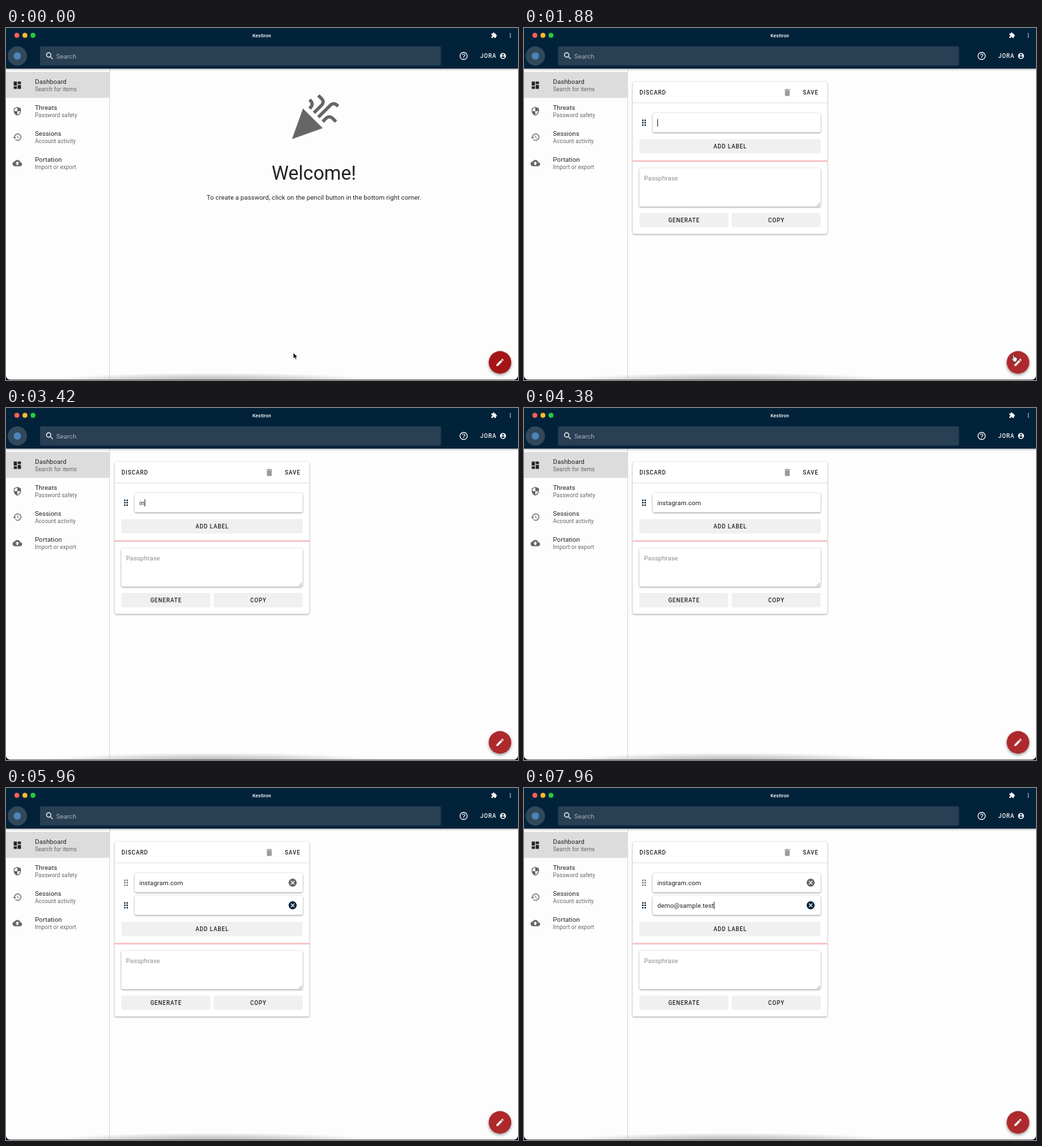
Animation, 768 px wide and 529 px high, one loop 8 s. Source, as an HTML page:

```html
<!DOCTYPE html>
<html lang="en">
<head>
<meta charset="utf-8">
<title>Password manager</title>
<style>
html, body { margin: 0; width: 100%; height: 100%; overflow: hidden; background: #000; }
svg { display: block; width: 768px; height: 529px; font-family: Roboto, "Open Sans", sans-serif; }
text { font-size: 9.6px; letter-spacing: .09px; fill: #212121; white-space: pre; }
.sub { font-size: 8.4px; fill: #666; }
.btn { font-size: 8.4px; font-weight: 500; letter-spacing: .75px; }
.mid { text-anchor: middle; }
.card { fill: #fff; filter: drop-shadow(0 1px 1px rgba(0,0,0,.3)) drop-shadow(0 0 1px rgba(0,0,0,.14)); }
.field { fill: #fff; filter: drop-shadow(0 1px .8px rgba(0,0,0,.36)) drop-shadow(0 0 .8px rgba(0,0,0,.12)); }
.flat { fill: #f0f0f0; }
</style>
</head>
<body>
<svg id="stage" viewBox="0 0 768 529"></svg>
<script>
const LOOP = 8000;
const NAVY = '#02223a', GREY = '#666', DIM = '#777';
const OPEN = 1580, TYPE1 = 3330, FOCUS = 4960, PRESS = 5130, ADD = 5210;
const LABEL1 = 'instagram.com', LABEL2 = 'demo@sample.test';

const paths = {
  dashboard: 'M3 13h8V3H3v10zm0 8h8v-6H3v6zm10 0h8V11h-8v10zm0-18v6h8V3h-8z',
  shield: 'M12 1L3 5v6c0 5.55 3.84 10.74 9 12 5.16-1.26 9-6.45 9-12V5l-9-4zm0 10.99h7c-.53 4.12-3.28 7.79-7 8.94V12H5V6.3l7-3.11v8.8z',
  history: 'M13 3c-4.97 0-9 4.03-9 9H1l3.89 3.89.07.14L9 12H6c0-3.87 3.13-7 7-7s7 3.13 7 7-3.13 7-7 7c-1.93 0-3.68-.79-4.94-2.06l-1.42 1.42C8.27 19.99 10.51 21 13 21c4.97 0 9-4.03 9-9s-4.03-9-9-9zm-1 5v5l4.28 2.54.72-1.21-3.5-2.08V8H12z',
  backup: 'M19.35 10.04C18.67 6.59 15.64 4 12 4 9.11 4 6.6 5.64 5.35 8.04 2.34 8.36 0 10.91 0 14c0 3.31 2.69 6 6 6h13c2.76 0 5-2.24 5-5 0-2.64-2.05-4.78-4.65-4.96zM14 13v4h-4v-4H7l5-5 5 5h-3z',
  search: 'M15.5 14h-.79l-.28-.27C15.41 12.59 16 11.11 16 9.5 16 5.91 13.09 3 9.5 3S3 5.91 3 9.5 5.91 16 9.5 16c1.61 0 3.09-.59 4.23-1.57l.27.28v.79l5 4.99L20.49 19l-4.99-5zm-6 0C7.01 14 5 11.99 5 9.5S7.01 5 9.5 5 14 7.01 14 9.5 11.99 14 9.5 14z',
  help: 'M11 18h2v-2h-2v2zm1-16C6.48 2 2 6.48 2 12s4.48 10 10 10 10-4.48 10-10S17.52 2 12 2zm0 18c-4.41 0-8-3.59-8-8s3.59-8 8-8 8 3.59 8 8-3.59 8-8 8zm0-14c-2.21 0-4 1.79-4 4h2c0-1.1.9-2 2-2s2 .9 2 2c0 2-3 1.75-3 5h2c0-2.25 3-2.5 3-5 0-2.21-1.79-4-4-4z',
  person: 'M12 2C6.48 2 2 6.48 2 12s4.48 10 10 10 10-4.48 10-10S17.52 2 12 2zm0 3c1.66 0 3 1.34 3 3s-1.34 3-3 3-3-1.34-3-3 1.34-3 3-3zm0 14.2c-2.5 0-4.71-1.28-6-3.22.03-1.99 4-3.08 6-3.08 1.99 0 5.97 1.09 6 3.08-1.29 1.94-3.5 3.22-6 3.22z',
  puzzle: 'M20.5 11H19V7c0-1.1-.9-2-2-2h-4V3.5C13 2.12 11.88 1 10.5 1S8 2.12 8 3.5V5H4c-1.1 0-1.99.9-1.99 2v3.8H3.5c1.49 0 2.7 1.21 2.7 2.7s-1.21 2.7-2.7 2.7H2V20c0 1.1.9 2 2 2h3.8v-1.5c0-1.49 1.21-2.7 2.7-2.7 1.49 0 2.7 1.21 2.7 2.7V22H17c1.1 0 2-.9 2-2v-4h1.5c1.38 0 2.5-1.12 2.5-2.5S21.88 11 20.5 11z',
  more: 'M12 8a2 2 0 1 0 0-4 2 2 0 0 0 0 4zm0 2a2 2 0 1 0 0 4 2 2 0 0 0 0-4zm0 6a2 2 0 1 0 0 4 2 2 0 0 0 0-4z',
  edit: 'M3 17.25V21h3.75L17.81 9.94l-3.75-3.75L3 17.25zM20.71 7.04c.39-.39.39-1.02 0-1.41l-2.34-2.34c-.39-.39-1.02-.39-1.41 0l-1.83 1.83 3.75 3.75 1.83-1.83z',
  bin: 'M6 19c0 1.1.9 2 2 2h8c1.1 0 2-.9 2-2V7H6v12zM19 4h-3.5l-1-1h-5l-1 1H5v2h14V4z',
  cancel: 'M12 2C6.47 2 2 6.47 2 12s4.47 10 10 10 10-4.47 10-10S17.53 2 12 2zm5 13.59L15.59 17 12 13.41 8.41 17 7 15.59 10.59 12 7 8.41 8.41 7 12 10.59 15.59 7 17 8.41 13.41 12 17 15.59z'
};

// Markup helpers; icons are placed by their centre.
const at = (x, y, size) => `translate(${x - size / 2} ${y - size / 2}) scale(${size / 24})`;
const icon = (name, x, y, fill, size = 14.4, id = '') =>
  `<path id="${id}" d="${paths[name]}" fill="${fill}" transform="${at(x, y, size)}"/>`;
const text = (x, y, str, cls = '', more = '') => `<text x="${x}" y="${y}" class="${cls}" ${more}>${str}</text>`;
const rect = (x, y, w, h, more = '') => `<rect x="${x}" y="${y}" width="${w}" height="${h}" ${more}/>`;
const circle = (x, y, r, fill, more = '') => `<circle cx="${x}" cy="${y}" r="${r}" fill="${fill}" ${more}/>`;
const button = (x, y, w, label) =>
  rect(x, y, w, 21.5, 'class="flat" rx="2.4"') + text(x + w / 2 + .3, y + 13.8, label, 'btn mid');

const grip = (id, y) => `<g id="${id}">` +
  [-3.6, 0, 3.6].map(d => circle(178.2, y + d, 1.2) + circle(181.8, y + d, 1.2)).join('') + '</g>';
const row = (n, y) => grip('grip' + n, y) + rect(193, y - 14.5, 252, 29, 'class="field" rx="2.4"') +
  text(200, y + 3.6, '', '', `id="input${n}"`) + icon('cancel', 430, y, GREY, 14.4, 'clear' + n);

const menu = [
  ['dashboard', 'Dashboard', 'Search for items'],
  ['shield', 'Threats', 'Password safety'],
  ['history', 'Sessions', 'Account activity'],
  ['backup', 'Portation', 'Import or export']
].map(([name, head, sub], i) => {
  const y = 86 + 39 * i;
  return icon(name, 17, y, i ? GREY : '#212121') + text(43.5, y - 2.5, head) + text(43.5, y + 9, sub, 'sub');
}).join('');

const lights = ['#ff5f57', '#febc2e', '#28c840'].map((c, i) => circle(16.3 + 12.1 * i, 11, 3.7, c)).join('');

const header = `<path d="M0 0H768V61H0z" fill="${NAVY}" style="filter:drop-shadow(0 1.5px 1.5px rgba(0,0,0,.4))"/>` +
  lights + text(383.7, 13.7, 'Kestiron', 'mid', 'style="font-size:7.3px;font-weight:500;fill:#fff"') +
  icon('puzzle', 732, 11, '#fff', 9.6) + icon('more', 756.5, 11, '#fff', 9.6) +
  circle(17, 42, 14.5, '#32485b') + circle(17, 42, 5.5, '#4b86b8') +
  rect(51, 27.5, 601.5, 29, 'rx="2.4" fill="#283f54"') + icon('search', 65.5, 42, '#fff') +
  text(75.5, 45.6, 'Search', '', 'style="fill:#a9b2bb"') + icon('help', 686.5, 42, '#fff') +
  text(711.5, 45, 'JORA', 'btn', 'style="fill:#fff"') + icon('person', 745.5, 42, '#fff', 10.8);

const welcome = `<g id="welcome"><g transform="${at(461.9, 134.1, 79)}">
  <path d="M2 22l14-5-9-9z" fill="${GREY}"/>
  <path d="M14 12l5.59-5.59a2 2 0 0 1 2.83 0l.59.59M10 8l.59-.59a2 2 0 0 0 0-2.83L10 4M16 14l1.59-1.59a2 2 0 0 1 2.83 0l1.61 1.61M12 10l3.59-3.59a2 2 0 0 0 0-2.83L14 2" fill="none" stroke="${GREY}" stroke-width="1.5"/></g>` +
  text(461.9, 228, 'Welcome!', 'mid', 'style="font-size:28.8px;letter-spacing:0"') +
  text(461.9, 258, 'To create a password, click on the pencil button in the bottom right corner.', 'mid') + '</g>';

const form = '<g id="form">' + rect(163, 81, 292, 228, 'id="card" class="card" rx="2.4"') +
  text(173.3, 100, 'DISCARD', 'btn') + icon('bin', 395, 96.8, '#9a9a9a') + text(418.3, 100, 'SAVE', 'btn') +
  rect(163, 112, 292, 1, 'fill="#e0e0e0"') + row(1, 142.3) +
  `<g id="second">${row(2, 176.3)}</g>` +
  '<g id="lower">' + rect(173, 167, 272, 21.5, 'class="flat" rx="2.4"') +
  '<g clip-path="url(#addClip)">' + rect(173, 167, 272, 21.5, 'id="addFocus"') +
  circle(309, 177.7, 82, '#000', 'id="addRipple"') + '</g>' +
  text(309.3, 180.8, 'ADD LABEL', 'btn mid') +
  rect(163, 198.7, 292, 2.5, 'fill="#f7bfc2"') +
  rect(173, 210.5, 272, 58, 'class="field" rx="2.4"') + text(180, 229, 'Passphrase', '', 'style="fill:#8c8c8c"') +
  '<path d="M439.2 267.6l4.8-4.8M442 267.6l2-2" stroke="#666" stroke-width=".7"/>' +
  button(173, 278, 133.5, 'GENERATE') + button(311.5, 278, 133.5, 'COPY') + '</g>' +
  rect(0, 0, .9, 11, 'id="caret" fill="#111"') + '</g>';

const fab = circle(741, 502.5, 16.9, '#a51417', 'style="filter:drop-shadow(0 2px 2px rgba(0,0,0,.4))"') +
  '<g clip-path="url(#fabClip)">' + circle(741, 502.5, 16.9, '#fff', 'id="fabHover"') +
  circle(734, 492, 10, '#fff', 'id="fabRipple"') + '</g>' + icon('edit', 741, 502.5, '#fff');

const pointer = `<g id="pointer">
  <path id="arrow" d="M0 0V9l2.1-1.9 1.4 3.2 1.6-.7-1.4-3.1H6.5z" fill="#000" stroke="#fff" stroke-width=".7"/>
  <path id="hand" d="M-1 0C-1-1.2 .7-1.2 .9 0L1.5 2.8C2 2.2 2.8 2.4 3 3 3.6 2.5 4.3 2.8 4.5 3.5 5.2 3.2 5.7 3.7 5.7 4.5V6.5L4.7 8.4V9.8H.3L-.2 8.5-2.4 5.6C-2.8 4.8-1.7 4.2-1 5L-.4 5.6z" fill="#fff" stroke="#111" stroke-width=".7"/></g>`;

document.getElementById('stage').innerHTML = `<defs>
  <clipPath id="windowClip"><path d="M0 0H768V522.5a6 6 0 0 1-6 6H6a6 6 0 0 1-6-6z"/></clipPath>
  <clipPath id="addClip">${rect(173, 167, 272, 21.5, 'rx="2.4"')}</clipPath>
  <clipPath id="fabClip">${circle(741, 502.5, 16.9)}</clipPath>
  <radialGradient id="shade"><stop offset="0" stop-color="#000" stop-opacity=".3"/>
    <stop offset=".6" stop-color="#000" stop-opacity=".14"/><stop offset="1" stop-color="#000" stop-opacity="0"/></radialGradient>
  </defs><g clip-path="url(#windowClip)">` +
  rect(0, 0, 768, 529, 'fill="#fdfdfd"') + rect(0, 66, 155, 39, 'fill="#dcdcdc"') +
  rect(155, 61, 1, 468, 'fill="#dadada"') + menu + welcome + form + header +
  '<ellipse cx="310" cy="530" rx="250" ry="12" fill="url(#shade)"/>' + fab + '</g>' + pointer;

const el = id => document.getElementById(id);
const set = (id, attrs) => { for (const k in attrs) el(id).setAttribute(k, attrs[k]); };
const show = (id, on) => set(id, { visibility: on ? 'inherit' : 'hidden' });
const part = (t, from, len) => Math.min(1, Math.max(0, (t - from) / len));

// Material standard curve, cubic-bezier(.4, 0, .2, 1)
function ease(x) {
  let lo = 0, hi = 1;
  for (let i = 0; i < 20; i++) {
    const u = (lo + hi) / 2, v = 1 - u;
    if (1.2 * u * v * v + .6 * u * u * v + u * u * u < x) lo = u; else hi = u;
  }
  return lo * lo * (3 - 2 * lo);
}

// [first key time, gap between keys, characters before the run, run length]
const runs1 = [[TYPE1, 66.6, 0, 13]];
const runs2 = [[6000, 96, 0, 4], [6670, 0, 4, 1], [6920, 71, 5, 11]];

function typed(t, runs) {
  let count = 0, last = -1;
  for (const [start, gap, before, length] of runs) {
    if (t < start) break;
    const n = gap ? Math.min(length, Math.floor((t - start) / gap) + 1) : length;
    count = before + n;
    last = start + (n - 1) * gap;
  }
  return { count, last };
}

function ripple(id, t, start, r0, r1, alpha) {
  set(id, {
    r: r0 + (r1 - r0) * ease(part(t, start, 225)),
    opacity: alpha * part(t, start, 45) * (1 - part(t, start + 225, 150))
  });
}

function draw(t) {
  const open = t >= OPEN, added = t >= ADD;
  show('welcome', !open);
  show('form', open);
  show('second', added);
  show('clear1', added);
  set('card', { height: added ? 262.5 : 228.5 });
  set('lower', { transform: `translate(0 ${added ? 34 : 0})` });

  const one = typed(t, runs1), two = typed(t, runs2);
  el('input1').textContent = LABEL1.slice(0, one.count);
  el('input2').textContent = LABEL2.slice(0, two.count);
  set('grip1', { fill: t < FOCUS ? NAVY : DIM });
  set('grip2', { fill: NAVY });
  set('clear2', { fill: NAVY });

  const line = added ? two : one;
  const since = t - Math.max(line.last, added ? ADD : OPEN);
  const focused = open && (t < 4170 || added);
  show('caret', focused && since % 1000 < 500);
  const input = el(added ? 'input2' : 'input1');
  const width = line.count ? input.getComputedTextLength() : 0;
  set('caret', { x: 200 + width, y: added ? 171 : 137 });

  set('addFocus', { opacity: .24 * part(t, FOCUS, 75) * (1 - part(t, ADD, 75)) });
  ripple('addRipple', t, PRESS, 82, 142, .24);

  const move = ease(part(t, 60, 900));
  const x = 431 + 303 * move, y = 488 + 4 * move;
  const over = x > 728;
  show('arrow', !over);
  show('hand', over);
  show('pointer', t < TYPE1);
  set('pointer', { transform: `translate(${x} ${y})` });
  set('fabHover', { opacity: over ? .09 : 0 });
  ripple('fabRipple', t, OPEN - 100, 10, 32, .24);
}

const begin = performance.now();
function tick() {
  draw((performance.now() - begin) % LOOP);
  requestAnimationFrame(tick);
}
tick();
</script>
</body>
</html>
```
